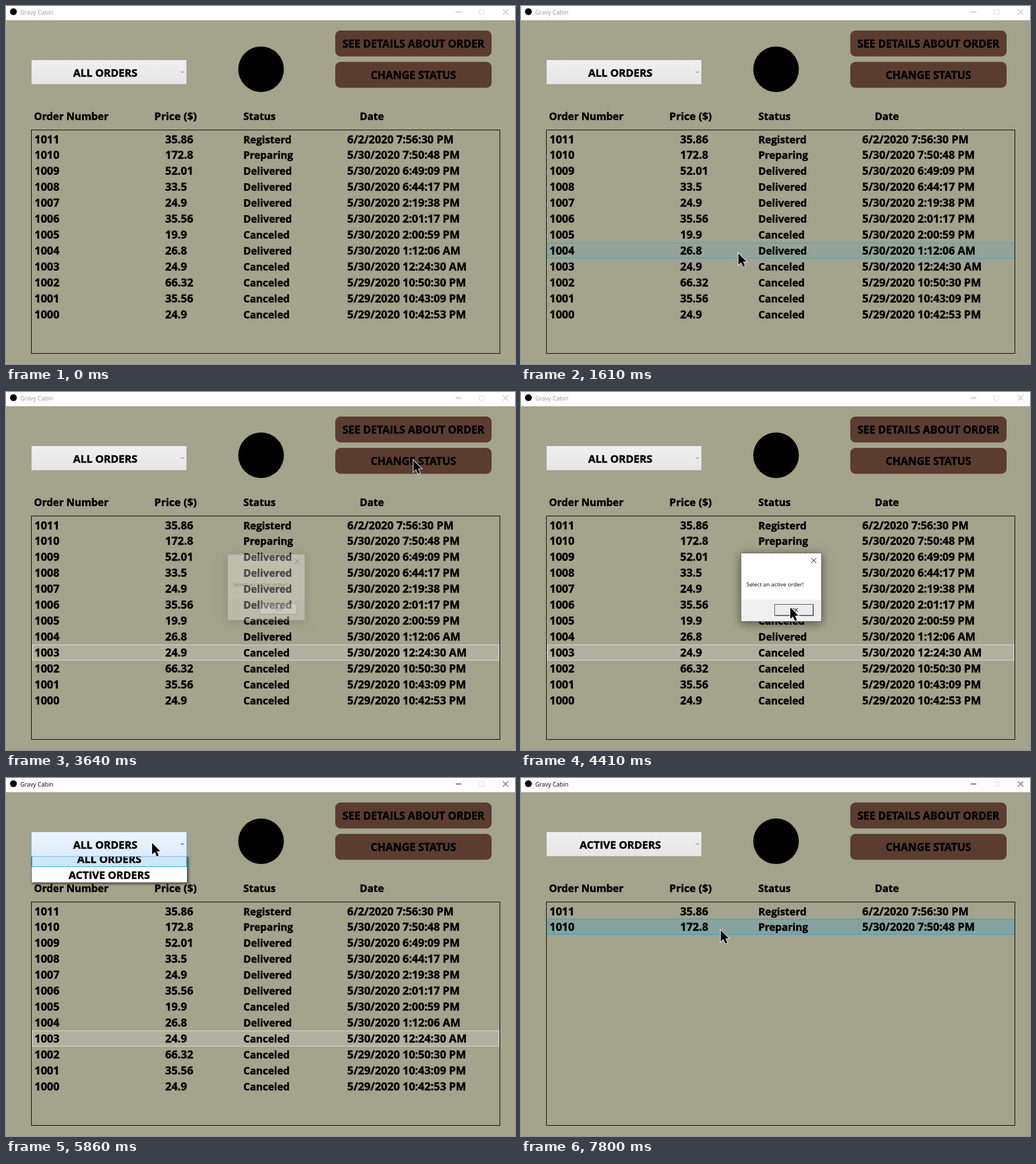
An HTML page with a canvas that plays this animation: 892 by 628 pixels, repeating every 8000 ms.

```html
<!DOCTYPE html>
<html lang="en">
<head>
<meta charset="utf-8">
<title>Gravy Cabin</title>
<style>
  html, body { margin: 0; width: 100%; height: 100%; overflow: hidden; background: #a4a38b; }
  canvas { display: block; }
</style>
</head>
<body>
<canvas id="stage" width="892" height="628"></canvas>
<script>
const ctx = document.getElementById('stage').getContext('2d');
const LOOP = 8000;
const FONT = '"Open Sans", "Noto Sans", sans-serif';

const ORDERS = [
  ['1011', '35.86', 'Registerd', '6/2/2020 7:56:30 PM'],
  ['1010', '172.8', 'Preparing', '5/30/2020 7:50:48 PM'],
  ['1009', '52.01', 'Delivered', '5/30/2020 6:49:09 PM'],
  ['1008', '33.5', 'Delivered', '5/30/2020 6:44:17 PM'],
  ['1007', '24.9', 'Delivered', '5/30/2020 2:19:38 PM'],
  ['1006', '35.56', 'Delivered', '5/30/2020 2:01:17 PM'],
  ['1005', '19.9', 'Canceled', '5/30/2020 2:00:59 PM'],
  ['1004', '26.8', 'Delivered', '5/30/2020 1:12:06 AM'],
  ['1003', '24.9', 'Canceled', '5/30/2020 12:24:30 AM'],
  ['1002', '66.32', 'Canceled', '5/29/2020 10:50:30 PM'],
  ['1001', '35.56', 'Canceled', '5/29/2020 10:43:09 PM'],
  ['1000', '24.9', 'Canceled', '5/29/2020 10:42:53 PM'],
];
const COLUMNS = [50, 279, 416, 598];
const ROW_TOP = 219.3, ROW_PITCH = 27.95;

const ROW_STYLES = {
  hover: ['rgba(38,160,218,.12)', 'rgba(38,160,218,.66)'],
  active: ['rgba(38,160,218,.24)', 'rgba(38,160,218,.9)'],
  inactive: ['rgba(218,218,218,.24)', '#dadada'],
};

// Pointer path: time, x, y
const PATH = [
  [440, 400, 538], [610, 385, 372], [695, 385, 372], [1080, 381, 434],
  [1610, 381, 434], [1930, 389, 440], [2030, 389, 440], [2250, 388, 457],
  [2645, 388, 457], [2720, 470, 425], [2790, 648, 345], [2950, 868, 205],
  [3410, 714, 120], [3955, 714, 120], [4410, 472, 378], [4795, 472, 378],
  [5560, 256, 114], [5880, 256, 114], [6330, 240, 174], [6735, 240, 174],
  [7090, 350, 267], [LOOP, 350, 267],
];

const clamp = v => Math.max(0, Math.min(1, v));
const between = (t, a, b) => t >= a && t < b;
const inside = (p, x, y, w, h) => !!p && p.x >= x && p.x < x + w && p.y >= y && p.y < y + h;

function pointerAt(t) {
  if (t < 440) return null;
  const i = PATH.findIndex(k => k[0] > t);
  const [t0, x0, y0] = PATH[i - 1], [t1, x1, y1] = PATH[i];
  const u = (t - t0) / (t1 - t0), e = u * u * (3 - 2 * u);
  return { x: Math.round(x0 + (x1 - x0) * e), y: Math.round(y0 + (y1 - y0) * e) };
}

function label(str, x, y, size, align = 'left') {
  ctx.font = `700 ${size}px ${FONT}`;
  ctx.textAlign = align;
  ctx.fillStyle = ctx.strokeStyle = '#000';
  ctx.lineWidth = 0.5;
  ctx.fillText(str, x, y);
  ctx.strokeText(str, x, y);
}

function smallText(str, x, y, size, color, align = 'left') {
  ctx.font = `400 ${size}px ${FONT}`;
  ctx.textAlign = align;
  ctx.fillStyle = color;
  ctx.fillText(str, x, y);
}

function box(x, y, w, h, fill, border) {
  if (fill) {
    ctx.fillStyle = fill;
    ctx.fillRect(x, y, w, h);
  }
  if (border) {
    ctx.strokeStyle = border;
    ctx.lineWidth = 1;
    ctx.strokeRect(x + 0.5, y + 0.5, w - 1, h - 1);
  }
}

function line(color, ...points) {
  ctx.strokeStyle = color;
  ctx.lineWidth = 1;
  ctx.beginPath();
  points.forEach(([x, y]) => ctx.lineTo(x, y));
  ctx.stroke();
}

function cross(x, y, r, color) {
  line(color, [x - r, y - r], [x + r, y + r]);
  line(color, [x - r, y + r], [x + r, y - r]);
}

function disc(x, y, r) {
  ctx.fillStyle = '#000';
  ctx.beginPath();
  ctx.arc(x, y, r, 0, 7);
  ctx.fill();
}

function titleBar(active) {
  const color = active ? '#000' : '#999';
  box(0, 0, 892, 25, '#fff');
  disc(13, 10, 6);
  smallText('Gravy Cabin', 25, 14.5, 10.4, color);
  line(color, [788, 10.5], [798, 10.5]);
  box(829, 6, 9, 9, null, '#ddd');
  cross(875.5, 10.5, 4.7, color);
}

function button(str, y, hovered) {
  ctx.fillStyle = hovered ? '#bee6fd' : '#5b3d30';
  ctx.beginPath();
  ctx.roundRect(577, y, 274, 45.5, 9);
  ctx.fill();
  label(str, 714, y + 30, 18.7, 'center');
}

function combo(str, hovered) {
  const fill = ctx.createLinearGradient(0, 94, 0, 138);
  fill.addColorStop(0, hovered ? '#ecf4fc' : '#f0f0f0');
  fill.addColorStop(1, hovered ? '#dcecfc' : '#e5e5e5');
  box(44, 94, 273, 44, fill, hovered ? '#7eb4ea' : '#acacac');
  label(str, 174, 123.5, 18.6, 'center');
  line(hovered ? '#000' : '#606060', [306.5, 114.5], [309, 117], [311.5, 114.5]);
}

function orderList(count, hoverRow, selectedRow, focused) {
  box(44, 217, 822, 393, null, '#000');
  ORDERS.slice(0, count).forEach((order, i) => {
    const top = ROW_TOP + ROW_PITCH * i;
    const state = i === selectedRow ? (focused ? 'active' : 'inactive') : i === hoverRow && 'hover';
    if (state) box(46, Math.round(top), 818, 28, ...ROW_STYLES[state]);
    order.forEach((cell, c) => label(cell, COLUMNS[c], Math.round(top + 21.2), c === 2 ? 17.9 : 19.1));
  });
}

function popup(offset, hoverSecond) {
  ctx.save();
  ctx.beginPath();
  ctx.rect(40, 138, 290, 70);
  ctx.clip();
  ctx.translate(0, offset);
  ctx.shadowColor = 'rgba(0,0,0,.55)';
  ctx.shadowBlur = 4;
  ctx.shadowOffsetX = ctx.shadowOffsetY = 2;
  box(44, 139, 274, 57, '#fff');
  ctx.shadowColor = 'transparent';
  box(44, 139, 274, 57, null, '#646464');
  box(45, hoverSecond ? 168 : 140, 272, 28, '#cbe8f6', '#26a0da');
  label('ALL ORDERS', 181, 161, 18.6, 'center');
  label('ACTIVE ORDERS', 181, 188.5, 18.6, 'center');
  ctx.restore();
}

function dialog(shown) {
  const scale = 0.94 + 0.06 * shown;
  ctx.save();
  ctx.globalAlpha = shown;
  ctx.translate(456, 342);
  ctx.scale(scale, scale);
  ctx.translate(-456, -342);

  // Shadow only outside the window, so the fade stays clean
  ctx.save();
  ctx.beginPath();
  ctx.rect(340, 240, 240, 210);
  ctx.rect(385, 282, 142, 121);
  ctx.clip('evenodd');
  ctx.shadowColor = 'rgba(0,0,0,.5)';
  ctx.shadowBlur = 16;
  ctx.shadowOffsetY = 3;
  box(385, 282, 142, 121, '#fff');
  ctx.restore();

  box(385, 282, 142, 82, '#fff');
  box(385, 364, 142, 39, '#f0f0f0');
  box(385, 282, 142, 121, null, '#6b6b6b');
  cross(513, 295.5, 4.5, '#000');
  smallText('Select an active order!', 395, 341, 9.8, '#000');
  box(444, 372, 69, 21, '#ececec', '#555');
  line('#777', [446, 391.5], [511.5, 391.5], [511.5, 374]);
  smallText('OK', 479, 386, 9.8, '#000', 'center');
  ctx.restore();
}

function pointer({ x, y }) {
  ctx.beginPath();
  [[0, 0], [0, 20], [4.6, 15.8], [8.2, 23.5], [11.6, 22], [8.2, 14.6], [14.2, 14.2]]
    .forEach(([dx, dy]) => ctx.lineTo(x + dx, y + dy));
  ctx.closePath();
  ctx.lineWidth = 1.8;
  ctx.strokeStyle = '#fff';
  ctx.stroke();
  ctx.fillStyle = '#000';
  ctx.fill();
}

function draw(t) {
  const p = pointerAt(t);
  const modal = between(t, 3550, 4870);
  const open = between(t, 5860, 6560);
  const filtered = t >= 6560;
  const hoverRow = !modal && !open && inside(p, 46, 219, 818, 390)
    ? Math.floor((p.y - ROW_TOP) / ROW_PITCH) : -1;
  const selectedRow = filtered ? (t >= 7800 ? 1 : -1) : (t >= 2490 ? 8 : -1);

  box(0, 0, 892, 628, '#a4a38b');
  titleBar(between(t, 2490, 3550) || t >= 4870);
  disc(447, 111, 40);
  button('SEE DETAILS ABOUT ORDER', 43, false);
  button('CHANGE STATUS', 98, !modal && inside(p, 577, 98, 274, 45));
  combo(filtered ? 'ACTIVE ORDERS' : 'ALL ORDERS', inside(p, 44, 94, 273, 44));

  label('Order Number', 49, 200, 17.9);
  label('Price ($)', 260, 200, 18.6);
  label('Status', 416, 200, 17.8);
  label('Date', 620, 200, 17.9);
  orderList(filtered ? 2 : ORDERS.length, hoverRow, selectedRow, t < 3550 || filtered);

  const shown = clamp((t - 3550) / 310) * clamp((5100 - t) / 230);
  if (shown > 0) dialog(shown);
  if (open) popup(t < 5940 ? -12 : 0, p.y >= 168);
  if (p && !between(t, 4720, 4870)) pointer(p);
}

const start = performance.now();
function tick() {
  draw((performance.now() - start) % LOOP);
  requestAnimationFrame(tick);
}
tick();
</script>
</body>
</html>
```
